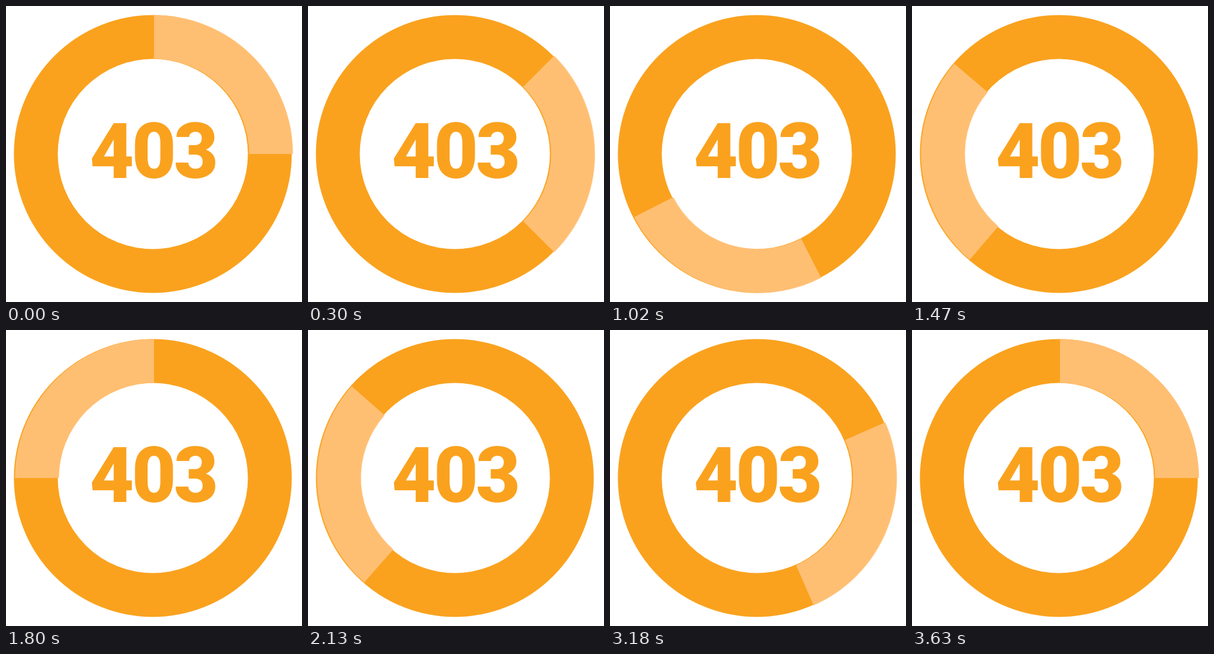
An HTML page without scripts for the animation above (3660 ms loop, 506 px wide and 506 px high).

```html
<!DOCTYPE html>
<html lang="en">
<head>
<meta charset="utf-8">
<title>403</title>
<style>
  html, body { margin: 0; width: 100%; height: 100%; overflow: hidden; background: #fff; }
  svg { display: block; width: 100vw; height: 100vh; }
  .ring, .arc { fill: none; stroke-width: 75; }
  .ring { stroke: #faa21e; }
  .arc {
    stroke: #ffbf73;
    transform-origin: 253px 253px;
    animation: swing 3660ms -1ms infinite;
  }
  text { font: 800 131px Roboto, sans-serif; fill: #faa21e; text-anchor: middle; letter-spacing: -4px; }

  /* 60 ticks out, 61 ticks back, one tick of rest */
  @keyframes swing {
    0% { transform: rotate(0deg); animation-timing-function: steps(60); }
    49.18033% { transform: rotate(270deg); animation-timing-function: steps(61); }
    99.18033%, 100% { transform: rotate(0deg); }
  }
</style>
</head>
<body>
<svg viewBox="0 0 506 506">
  <circle class="ring" cx="251" cy="253" r="200"/>
  <path class="arc" d="M253 53A200 200 0 0 1 453 253"/>
  <text x="251" y="294">403</text>
</svg>
</body>
</html>
```
